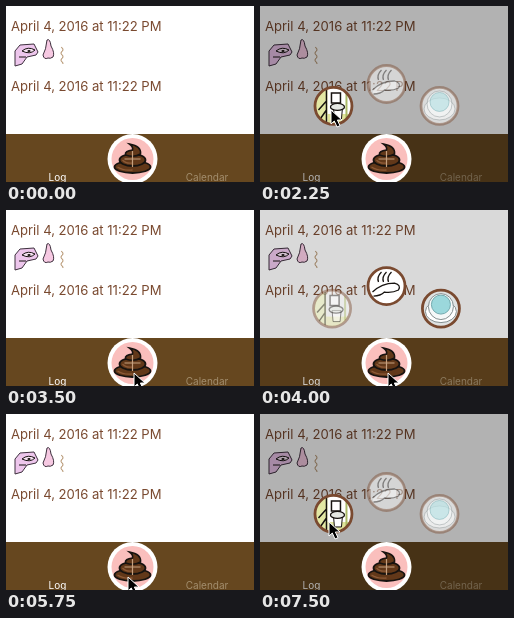
An HTML page with a canvas for the animation above (8000 ms loop, 248x176 px).

```html
<!DOCTYPE html>
<html lang="en">
<head>
<meta charset="utf-8">
<title>Log menu</title>
<style>
html, body { margin: 0; width: 100%; height: 100%; overflow: hidden; background: #fff; }
canvas { display: block; width: 248px; height: 176px; }
</style>
</head>
<body>
<canvas id="stage" width="248" height="176"></canvas>
<script>
const ctx = document.getElementById('stage').getContext('2d');
const LOOP = 8000, STEP = 250;
const BUTTON = { x: 126.5, y: 153 };
const RADIUS = 75;
const BROWN = '#7a4a30', INK = '#171310';

// The pointer comes to the button, opens the menu, and reaches an item.
const visits = [
  { starts: 500, opens: 750, arrives: 2250, closes: 2750, home: { x: 125.5, y: 145 }, goal: { x: 71, y: 104 }, lit: [0] },
  { starts: 3000, opens: 3750, arrives: 4750, closes: 5000, home: { x: 128, y: 163 }, goal: { x: 180, y: 113 }, lit: [1, 2] },
  { starts: 5250, opens: 5750, arrives: 7000, closes: LOOP, home: { x: 122, y: 163 }, goal: { x: 69, y: 108 }, lit: [0] }
];

const progress = (t, from, to) => Math.min(1, Math.max(0, (t - from) / (to - from)));
const easeOut = u => 1 - (1 - u) ** 3;
const mix = (a, b, u) => ({ x: a.x + (b.x - a.x) * u, y: a.y + (b.y - a.y) * u });

function menuState(t) {
  const visit = visits.findLast(v => t >= v.opens);
  if (!visit) return { extent: 0, dim: 0, lit: [] };
  const stay = 1 - progress(t, visit.closes, visit.closes + 500);
  const u = progress(t, visit.opens, visit.opens + 750);
  return {
    extent: (u + .8 * Math.sin(Math.PI * u)) * stay,
    dim: Math.min(progress(t, visit.opens, visit.opens + 500), stay),
    lit: visit.lit
  };
}

function pointerAt(t) {
  const i = visits.findLastIndex(v => t >= v.starts);
  if (i < 0) return null;
  const visit = visits[i];
  const from = i ? visits[i - 1].goal : { x: BUTTON.x, y: 176 };
  const atButton = mix(from, visit.home, progress(t, visit.starts, visit.starts + 500));
  return mix(atButton, visit.goal, easeOut(progress(t, visit.opens + 500, visit.arrives)));
}

function shape(d, fill, stroke, width = 1) {
  const path = new Path2D(d);
  if (fill) { ctx.fillStyle = fill; ctx.fill(path); }
  if (stroke) { ctx.strokeStyle = stroke; ctx.lineWidth = width; ctx.stroke(path); }
}

function ellipse(x, y, rx, ry, fill, stroke, width = 1) {
  ctx.beginPath();
  ctx.ellipse(x, y, rx, ry, 0, 0, Math.PI * 2);
  if (fill) { ctx.fillStyle = fill; ctx.fill(); }
  if (stroke) { ctx.strokeStyle = stroke; ctx.lineWidth = width; ctx.stroke(); }
}

function rect(x, y, w, h, fill) {
  ctx.fillStyle = fill;
  ctx.fillRect(x, y, w, h);
}

function text(str, x, y, size, color, align = 'left') {
  ctx.font = `${size}px Inter, sans-serif`;
  ctx.textAlign = align;
  ctx.fillStyle = color;
  ctx.fillText(str, x, y);
}

function at(x, y, draw) {
  ctx.save();
  ctx.translate(x, y);
  draw();
  ctx.restore();
}

function drawHand() {
  shape('M9 45L14 39L28 38L32 46L30 49L21 51L16 58L9 60Z', '#edc6ec', '#3d2f3d');
  shape('M16 45Q22 40 29 44Q24 49 16 45M13 51H20', '#f7e4f4', INK);
  ellipse(23, 45, 1.6, 1, INK);
}

function drawNose() {
  shape('M41 34Q44 32 45 40Q49 47 47 51Q44 53 42 52Q38 54 37 49Q40 44 41 34Z', '#f6c9e2', '#3d2f3d');
}

function drawWisp() {
  ctx.beginPath();
  for (let y = 41; y <= 58; y++) ctx.lineTo(56 + Math.sin(y * .9), y);
  ctx.strokeStyle = '#b99a78';
  ctx.lineWidth = 1.1;
  ctx.stroke();
}

function drawPage() {
  rect(0, 0, 248, 176, '#fff');
  for (const y of [25, 85]) text('April 4, 2016 at 11:22 PM', 5, y, 13.1, BROWN);
  drawHand();
  drawNose();
  drawWisp();
  rect(0, 128, 248, 48, '#66471f');
  text('Log', 51.5, 174.5, 10, '#fff', 'center');
  text('Calendar', 201, 174.5, 10, '#a28d6d', 'center');
}

function drawToilet() {
  rect(-20, -20, 14, 40, '#e3e8a4');
  rect(-6, 8, 26, 12, '#dfe39a');
  shape('M-7 -18V18M-15 4L-7 -5M-14 14L-7 4', null, INK, 1.5);
  shape('M-2 -13H7V-3H-2Z', '#fff', INK, 1.5);
  shape('M0 2L1 13H8L9 2Z', '#fff', INK);
  ellipse(4, 1, 7, 3.5, '#e5e8e3', INK, 1.3);
  shape('M13 -16V12', null, '#a9b967', 2);
}

function drawWipe() {
  for (const x of [-8, -3, 2]) shape(`M${x} -4Q${x - 2} -9 ${x + 3} -14`, null, INK, 1.3);
  shape('M-14 6Q-5 -3 8 -3Q15 -1 12 4Q6 7 -2 6Q-6 10 -13 10', '#fff', INK, 1.3);
}

function drawBowl() {
  rect(-20, -20, 40, 40, '#dfe2e2');
  ellipse(0, 3, 15.5, 11, '#fff', '#858f90');
  ellipse(0, -2, 12.5, 13, '#f5f8f8', '#858f90');
  ellipse(0, -4, 9.5, 9.5, '#9bd8dc', '#71a9ad');
}

const items = [
  { angle: -135, draw: drawToilet },
  { angle: -90, draw: drawWipe },
  { angle: -45, draw: drawBowl }
];

function drawItem({ angle, draw }, extent, alpha) {
  const a = angle * Math.PI / 180, r = RADIUS * extent;
  at(BUTTON.x + r * Math.cos(a), BUTTON.y + r * Math.sin(a), () => {
    ctx.globalAlpha = alpha;
    ctx.save();
    ctx.beginPath();
    ctx.arc(0, 0, 18, 0, Math.PI * 2);
    ctx.clip();
    rect(-20, -20, 40, 40, '#fff');
    draw();
    ctx.restore();
    ellipse(0, 0, 18.5, 18.5, null, BROWN, 2.8);
  });
}

function drawButton() {
  at(BUTTON.x, BUTTON.y, () => {
    ellipse(0, 0, 25, 25, '#fff');
    ellipse(0, 0, 21, 21, '#fabfbd');
    for (const [y, rx, ry] of [[8, 18, 6], [1, 13, 6]]) {
      ellipse(0, y, rx, ry, '#623819', INK, 1.8);
      shape(`M${3 - rx} ${y}Q${-rx / 2} ${y + 4} 0 ${y + 3}`, null, '#8d5a37', 1.3);
    }
    shape('M-3 -15Q9 -13 8 -5Q2 -1 -7 -4Q-8 -8 0 -9Q1 -12 -3 -15Z', '#623819', INK, 1.6);
    shape('M-8 0H8M0 -8V8', null, '#c5a07f', 1.2);
  });
}

function drawPointer({ x, y }) {
  at(x, y, () => shape('M0 0V14L3.3 11L6 17L9 15.7L6.4 10H11Z', '#000', '#fff'));
}

function render(t) {
  const { extent, dim, lit } = menuState(t);
  const pointer = pointerAt(t);
  drawPage();
  rect(0, 0, 248, 176, `rgba(0,0,0,${.3 * dim})`);
  if (extent > 0) items.forEach((item, i) => drawItem(item, extent, lit.includes(i) ? 1 : .45));
  drawButton();
  if (pointer) drawPointer(pointer);
}

function frame() {
  const t = performance.now() % LOOP;
  render(Math.floor(t / STEP) * STEP);
  requestAnimationFrame(frame);
}
frame();
</script>
</body>
</html>
```
